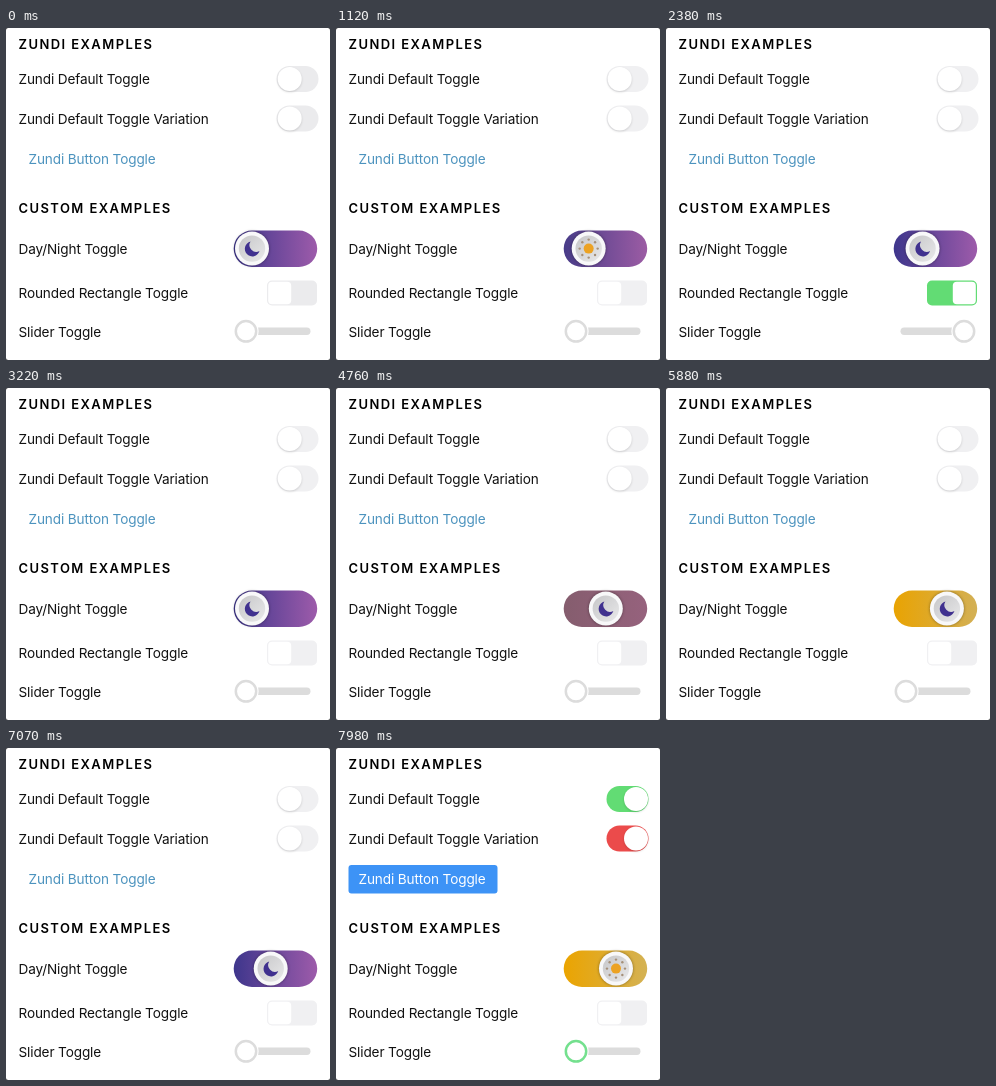
An HTML page for the animation above (8 s loop, 324 px wide and 332 px high).

```html
<!DOCTYPE html>
<html lang="en">
<head>
<meta charset="utf-8">
<title>Toggle examples</title>
<style>
  html, body { margin: 0; width: 100%; height: 100%; overflow: hidden; background: #444; }
  svg { display: block; width: 324px; height: 332px; background: #fff; border-radius: 2.5px; }
  text { font: 13.6px Inter, Roboto, sans-serif; letter-spacing: -.13px; fill: #111; }
  .head { font-size: 13px; font-weight: 600; letter-spacing: 1.43px; fill: #000; }
  .knob { fill: #fff; filter: drop-shadow(0 1px 1.2px rgba(0, 0, 0, .15)); }
  #orb { filter: drop-shadow(0 0 1.5px rgba(0, 0, 0, .4)); }
</style>
</head>
<body>
<svg viewBox="0 0 324 332">
  <defs>
    <linearGradient id="sky"><stop offset="0"/><stop offset="1"/></linearGradient>
    <linearGradient id="disc" x2="1" y2="1">
      <stop offset="0" stop-color="#c6c6c8"/><stop offset="1" stop-color="#e9e9ea"/>
    </linearGradient>
  </defs>
  <text class="head" x="12.5" y="21">ZUNDI EXAMPLES</text>
  <text x="12.5" y="56.3">Zundi Default Toggle</text>
  <text x="12.5" y="95.5">Zundi Default Toggle Variation</text>
  <text class="head" x="12.5" y="185.2">CUSTOM EXAMPLES</text>
  <text x="12.5" y="225.5">Day/Night Toggle</text>
  <text x="12.5" y="270">Rounded Rectangle Toggle</text>
  <text x="12.5" y="308.5">Slider Toggle</text>

  <rect id="button" x="12.5" y="117" width="149" height="28.5" rx="3" fill="#3d93f6"/>
  <text id="label" x="22.5" y="136.3">Zundi Button Toggle</text>

  <rect id="green" x="270.5" y="38" width="42" height="26" rx="13"/>
  <circle id="greenKnob" class="knob" cy="51" r="12"/>
  <rect id="red" x="270.5" y="77.5" width="42" height="26" rx="13"/>
  <circle id="redKnob" class="knob" cy="90.5" r="12"/>

  <rect x="227.7" y="202.5" width="83.5" height="36.5" rx="18.25" fill="url(#sky)"/>
  <g id="orb">
    <circle r="17" fill="#f8f8f9"/>
    <circle r="13.2" fill="url(#disc)"/>
    <path id="moon" d="M-1.5-7A7.5 7.5 0 1 0 7.5 2.5A6.8 6.8 0 0 1-1.5-7z" fill="#40318f"/>
    <g id="sun"><circle r="5" fill="#eca223"/></g>
  </g>

  <rect id="box" x="261" y="252.5" width="50" height="25" rx="5"/>
  <rect id="boxKnob" y="253.7" width="23" height="22.6" rx="4" fill="#fff"/>

  <rect x="234.5" y="299.6" width="70" height="7.4" rx="3.7" fill="#dcdcdc"/>
  <g id="handle">
    <circle r="12.6" fill="#fff"/>
    <circle id="ring" r="10.2" fill="#fff" stroke-width="2.5"/>
  </g>
</svg>
<script>
const LOOP = 8000;
const $ = id => document.getElementById(id);
const set = (id, name, value) => $(id).setAttribute(name, value);
const clamp = v => Math.min(1, Math.max(0, v));
const lerp = (a, b, p) => a + (b - a) * p;
const mix = (a, b, p) => `rgb(${a.map((v, i) => Math.round(lerp(v, b[i], p)))})`;
const easeOut = p => 1 - (1 - p) ** 2;
const easeBoth = p => p * p * (3 - 2 * p);

const WHITE = [255, 255, 255], BLUE = [76, 147, 190];
const GREEN = [98, 220, 116], RED = [235, 75, 75], MINT = [116, 224, 142];
const SILVER = [220, 220, 220];
// left and right ends of the track at night, dusk and day
const SKY = [
  [[62, 54, 140], [157, 91, 170]],
  [[134, 94, 110], [150, 98, 124]],
  [[235, 164, 0], [212, 178, 84]]
];

// [start, on, colour delay, colour time]
const ALL = [[-1000, 0], [1120, 1], [2170, 0], [7770, 1]];
const ORB = [
  [-1000, 0, 0, 1], [1090, 1, 0, 447], [2160, 0, 57, 97],
  [4130, 1, 0, 198], [4640, 0, 57, 126], [5240, 1, 0, 198],
  [5823, 0, 57, 97], [6340, 1, 0, 198], [6916, 0, 57, 97], [7782, 1, 0, 198]
];

for (let i = 0; i < 8; i++) {
  const dot = document.createElementNS("http://www.w3.org/2000/svg", "circle");
  const a = i * Math.PI / 4;
  dot.setAttribute("cx", 9 * Math.cos(a));
  dot.setAttribute("cy", 9 * Math.sin(a));
  dot.setAttribute("r", 1.2);
  dot.setAttribute("fill", "#a58f78");
  $("sun").append(dot);
}

const latest = (list, t) => list.findLast(e => e[0] <= t);

function phase([start, on], t, delay, time, ease = easeBoth) {
  const p = ease(clamp((t - start - delay) / time));
  return on ? p : 1 - p;
}

function drawSwitches(t) {
  const now = latest(ALL, t);
  const shade = lerp(235, 240, clamp((t - 70) / 210));
  const off = [shade, shade, shade + 2];

  const flip = phase(now, t, 0, 200);
  set("green", "fill", mix(off, GREEN, flip));
  set("red", "fill", mix(off, RED, flip));
  for (const id of ["greenKnob", "redKnob"]) set(id, "cx", lerp(283.7, 300, flip));
  set("button", "opacity", flip);
  $("label").style.fill = mix(BLUE, WHITE, flip);

  const slide = phase(now, t, 210, 140);
  set("boxKnob", "x", lerp(262.2, 286.8, slide));
  set("box", "fill", mix(off, GREEN, phase(now, t, 210, 240)));
  set("handle", "transform", `translate(${lerp(240, 298, slide)} 303.3)`);
  set("ring", "stroke", mix(SILVER, MINT, phase(now, t, 0, 200)));
}

function drawOrb(t) {
  const now = latest(ORB, t);
  const x = lerp(246, 293, phase(now, t, 0, 420, easeOut));
  set("orb", "transform", `translate(${x} 220.6)`);
  set("sun", "visibility", now[1] ? "visible" : "hidden");
  set("moon", "visibility", now[1] ? "hidden" : "visible");

  const day = 2 * phase(now, t, now[2], now[3], p => p);
  const i = day < 1 ? 0 : 1;
  [...$("sky").children].forEach((stop, side) =>
    stop.setAttribute("stop-color", mix(SKY[i][side], SKY[i + 1][side], day - i)));
}

function frame() {
  const t = performance.now() % LOOP;
  drawSwitches(t);
  drawOrb(t);
  requestAnimationFrame(frame);
}
frame();
</script>
</body>
</html>
```
